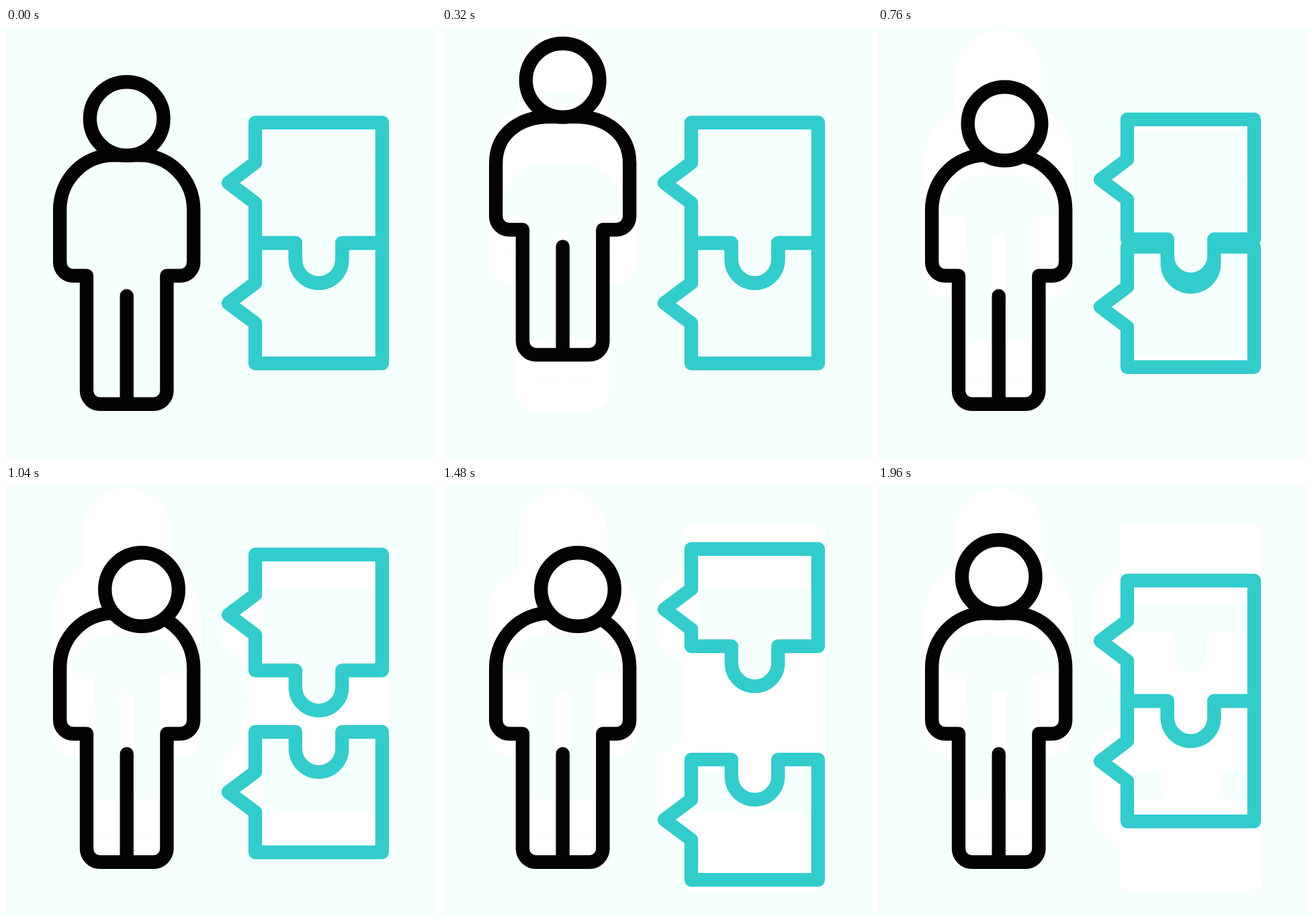
An HTML page with a canvas for the animation above (2 s loop, 640 px wide and 640 px high).

```html
<!DOCTYPE html>
<html lang="en">
<head>
<meta charset="utf-8">
<title>Person and puzzle</title>
<style>
  html, body { margin: 0; width: 100%; height: 100%; overflow: hidden; background: #f5fffd; }
  canvas { display: block; width: 100vw; height: 100vh; }
</style>
</head>
<body>
<canvas id="stage" width="640" height="640"></canvas>
<script>
const ctx = document.getElementById('stage').getContext('2d');
const LOOP = 2000, TICK = 40;
const PAPER = '#f5fffd', TRAIL = '#ffffff', INK = '#030303', TEAL = '#33cccc';
const LINE = 20.4, TRAIL_LINE = 22.4;
const PERSON_START = 2, PUZZLE_START = 16;

// Eased value at time t through [time, value] keys.
function track(t, ...keys) {
  if (t <= keys[0][0]) return keys[0][1];
  for (let i = 1; i < keys.length; i++) {
    const [t0, v0] = keys[i - 1], [t1, v1] = keys[i];
    if (t < t1) {
      const s = (t - t0) / (t1 - t0);
      return v0 + (v1 - v0) * s * s * (3 - 2 * s);
    }
  }
  return keys[keys.length - 1][1];
}

const jump = (t, peak, squash) => track(t, [80, 0], [280, peak], [480, squash], [680, 0]);

function personPose(t) {
  const lean = track(t, [640, 0], [920, 1], [1480, 1], [1940, 0]);
  const top = jump(t, -66, 19);
  return {
    top, arms: jump(t, -79, 22), feet: jump(t, -82, 0),
    headX: 179.7 + 22.3 * lean, headY: 135 + top + 19 * lean
  };
}

function puzzlePose(t) {
  return {
    upperTop: track(t, [640, 0], [1400, -72], [1640, 24], [1800, 0]),
    upperBar: track(t, [640, 0], [1440, -91], [1640, 0]),
    lowerBar: track(t, [640, 0], [1440, 92], [1728, 0]),
    lowerEnd: track(t, [640, 0], [1440, 92], [1760, -22], [1920, 0])
  };
}

function circle(x, y, r) {
  const path = new Path2D();
  path.arc(x, y, r, 0, Math.PI * 2);
  return path;
}

function bodyPath({ top, arms, feet }) {
  const neck = 189.3 + top, side = 270 + arms, hip = 368.8 + arms, sole = 559.8 + feet;
  return new Path2D(`M160 ${neck}
    C116 ${neck} 80.2 ${side - 44.5} 80.2 ${side}
    V${hip - 20} a20 20 0 0 0 20 20 H120
    V${sole - 20} a20 20 0 0 0 20 20 H219.4 a20 20 0 0 0 20 -20
    V${hip} H259.2 a20 20 0 0 0 20 -20 V${side}
    C279.2 ${side - 44.5} 243.4 ${neck} 199.4 ${neck} Z
    M179.7 ${398.8 + feet} V${sole}`);
}

const barAndTab = shift => `H430.8 v25 a34.7 34.7 0 0 0 69.4 0 V${320 + shift} H559.8`;

const upperPath = ({ upperTop: a, upperBar: b }) => new Path2D(`M559.8 ${140.8 + a}
  H371 V${200.5 + a} L331 ${230.5 + a} L371 ${260.5 + a} V${320 + b} ${barAndTab(b)} Z`);

const lowerPath = ({ lowerBar: c, lowerEnd: d }) => new Path2D(`M371 ${320 + c}
  ${barAndTab(c)} V${499.2 + d} H371 V${439.5 + d} L331 ${409.5 + d} L371 ${379.5 + d} Z`);

function stroke(path, color, width) {
  ctx.strokeStyle = color;
  ctx.lineWidth = width;
  ctx.stroke(path);
}

function drawPerson(t, color, width) {
  const pose = personPose(t);
  // The shoulder line stays hidden inside the head.
  const outside = new Path2D('M0 0H640V640H0Z');
  outside.addPath(circle(pose.headX, pose.headY, 50));
  ctx.save();
  ctx.clip(outside, 'evenodd');
  stroke(bodyPath(pose), color, width);
  ctx.restore();
  stroke(circle(pose.headX, pose.headY, 54.8), color, width);
}

function drawPuzzle(t, color, width) {
  const pose = puzzlePose(t);
  stroke(upperPath(pose), color, width);
  stroke(lowerPath(pose), color, width);
}

function render(tick) {
  ctx.fillStyle = PAPER;
  ctx.fillRect(0, 0, 640, 640);
  ctx.lineCap = ctx.lineJoin = 'round';
  // Earlier poses leave a white trail until the loop restarts.
  for (let i = PERSON_START; i < tick; i++) {
    drawPerson(i * TICK, TRAIL, TRAIL_LINE);
    if (i >= PUZZLE_START) drawPuzzle(i * TICK, TRAIL, TRAIL_LINE);
  }
  drawPuzzle(tick * TICK, TEAL, LINE);
  drawPerson(tick * TICK, INK, LINE);
}

let shown = -1;
const start = performance.now();
function frame() {
  const tick = Math.floor((performance.now() - start) % LOOP / TICK);
  if (tick !== shown) render(shown = tick);
  requestAnimationFrame(frame);
}
frame();
</script>
</body>
</html>
```
